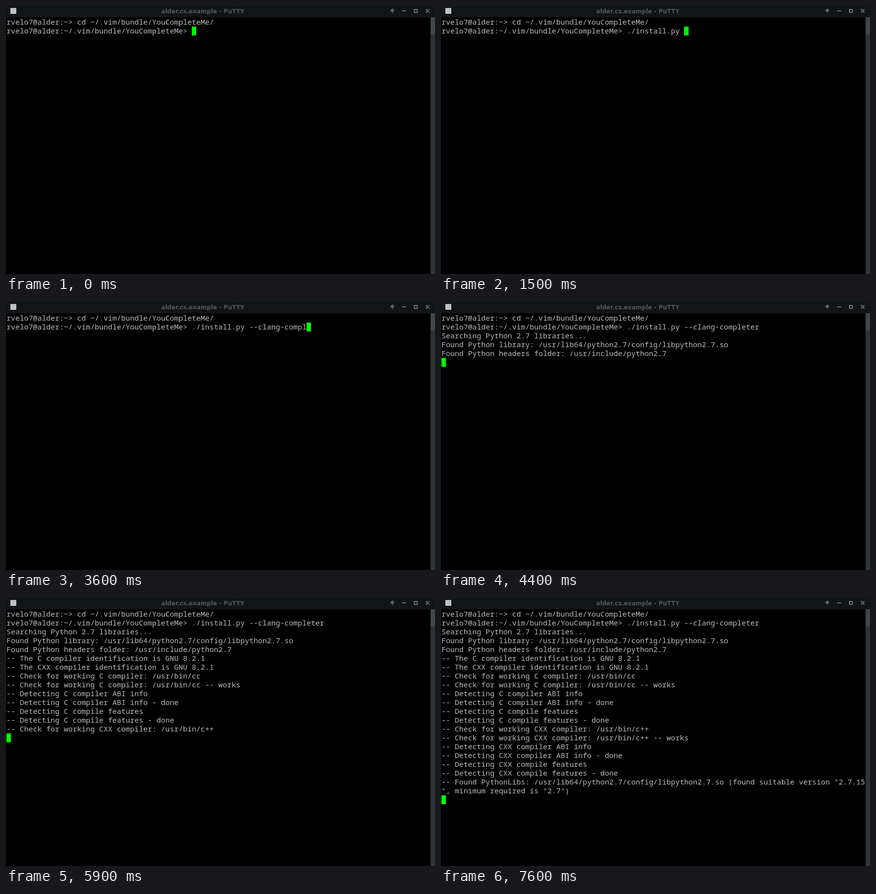
Recreate the animation shown at these times as an HTML page. Size 875x546 px, loop 8000 ms.

```html
<!DOCTYPE html>
<html lang="en">
<head>
<meta charset="utf-8">
<title>Terminal</title>
<style>
  html, body { margin: 0; width: 100%; height: 100%; overflow: hidden; background: #000; }
  svg { display: block; }
  .title { font: bold 12px "DejaVu Sans", sans-serif; fill: #4f5859; text-anchor: middle; }
  .row { font: 15px "Noto Sans Mono", "Liberation Mono", monospace; fill: #bbb; white-space: pre; font-variant-ligatures: none; }
  .buttons { fill: none; stroke: #697375; stroke-width: 2; }
</style>
</head>
<body>
<svg width="875" height="546" viewBox="0 0 875 546">
  <rect width="875" height="546"/>
  <rect width="875" height="23" fill="#0f1618"/>
  <rect x="9" y="4" width="12" height="12" fill="#c0c0c0"/>
  <text class="title" x="401.5" y="15">alder.cs.example - PuTTY</text>
  <path class="buttons" d="M788 14V7M784 10.5L788 6.5L792 10.5M808 10H816M833 7H839V13H833ZM856.5 6.5L863.5 13.5M863.5 6.5L856.5 13.5"/>
  <rect x="866" y="23" width="9" height="523" fill="#2c3636"/>
  <rect x="866" y="23" width="9" height="35" fill="#3d484a"/>
  <rect id="cursor" width="9" height="18" fill="#0f0"/>
  <g id="screen"></g>
</svg>
<script>
const LOOP = 8000, STEP = 100;
const CELL_W = 9, CELL_H = 18, LEFT = 1, TOP = 24, BASELINE = 14;
const user = "rvelo7@alder:";
const history = user + "~> cd ~/.vim/bundle/YouCompleteMe/";
const prompt = user + "~/.vim/bundle/YouCompleteMe> ";

// Each burst types its text evenly between two times.
const bursts = [
  { text: "./instal", from: 300, to: 1000 },
  { text: "l.py ", from: 1200, to: 1500 },
  { text: "--cl", from: 2000, to: 2600 },
  { text: "ang-", from: 2700, to: 3000 },
  { text: "com", from: 3200, to: 3400 },
  { text: "pl", from: 3500, to: 3600 },
  { text: "eter", from: 3700, to: 4000 }
];

const works = (name, path) => [
  `-- Check for working ${name} compiler: ${path} -- works`,
  `-- Detecting ${name} compiler ABI info`
];
const features = name => [
  `-- Detecting ${name} compile features`,
  `-- Detecting ${name} compile features - done`
];
const abiDone = name => `-- Detecting ${name} compiler ABI info - done`;

// Lines that the command prints together.
const output = [
  { at: 4400, lines: [
    "Searching Python 2.7 libraries...",
    "Found Python library: /usr/lib64/python2.7/config/libpython2.7.so",
    "Found Python headers folder: /usr/include/python2.7"] },
  { at: 4600, lines: ["-- The C compiler identification is GNU 8.2.1"] },
  { at: 4900, lines: [
    "-- The CXX compiler identification is GNU 8.2.1",
    "-- Check for working C compiler: /usr/bin/cc"] },
  { at: 5300, lines: [...works("C", "/usr/bin/cc"), abiDone("C"), features("C")[0]] },
  { at: 5900, lines: [features("C")[1], "-- Check for working CXX compiler: /usr/bin/c++"] },
  { at: 6100, lines: works("CXX", "/usr/bin/c++") },
  { at: 6400, lines: [abiDone("CXX"), features("CXX")[0]] },
  { at: 7600, lines: [
    features("CXX")[1],
    '-- Found PythonLibs: /usr/lib64/python2.7/config/libpython2.7.so (found suitable version "2.7.15',
    '", minimum required is "2.7")'] }
];

const screen = document.getElementById("screen");
const cursor = document.getElementById("cursor");

function typedAt(time) {
  return bursts.map(({ text, from, to }) => {
    const progress = Math.min(1, Math.max(0, (time - from) / (to - from)));
    return text.slice(0, Math.floor(text.length * progress));
  }).join("");
}

function linesAt(time) {
  const printed = output.filter(group => group.at <= time).flatMap(group => group.lines);
  const lines = [history, prompt + typedAt(time), ...printed];
  if (printed.length) lines.push("");
  return lines;
}

function makeRow(text, index) {
  const row = document.createElementNS("http://www.w3.org/2000/svg", "text");
  row.setAttribute("class", "row");
  row.setAttribute("x", LEFT);
  row.setAttribute("y", TOP + index * CELL_H + BASELINE);
  row.textContent = text;
  return row;
}

function draw(time) {
  const lines = linesAt(time);
  screen.replaceChildren(...lines.map(makeRow));
  cursor.setAttribute("x", LEFT + lines.at(-1).length * CELL_W);
  cursor.setAttribute("y", TOP + (lines.length - 1) * CELL_H);
}

const origin = performance.now();
let shown = -1;
function tick() {
  const elapsed = (performance.now() - origin) % LOOP;
  const time = Math.floor(elapsed / STEP) * STEP;
  if (time !== shown) draw(shown = time);
  requestAnimationFrame(tick);
}
tick();
</script>
</body>
</html>
```
